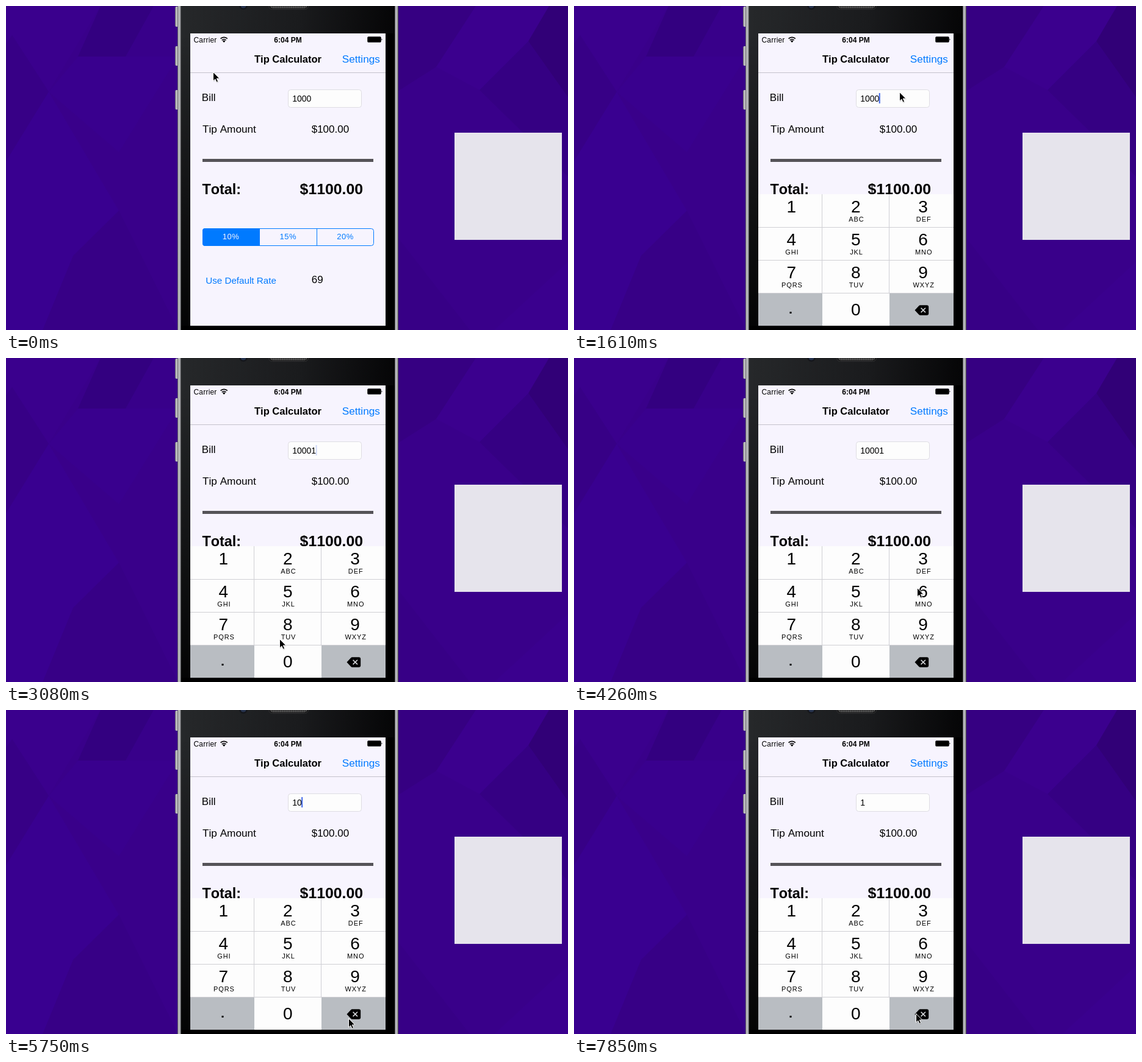
Animation of 921 by 532 pixels, one loop 8 s. Source, as an HTML page:

```html
<!DOCTYPE html>
<html lang="en">
<head>
<meta charset="utf-8">
<title>Tip Calculator</title>
<style>
  html, body { margin: 0; width: 100%; height: 100%; overflow: hidden; background: #38008a; }
  svg { display: block; width: 921px; height: 532px; }
  text { font-family: "Liberation Sans", Arial, sans-serif; font-kerning: none; white-space: pre; }
  .b { font-weight: bold; }
  .blue { fill: #007aff; }
  .mid { text-anchor: middle; }
</style>
</head>
<body>
<svg viewBox="0 0 921 532">
  <defs>
    <linearGradient id="metal">
      <stop offset="0" stop-color="#3c3c40"/>
      <stop offset=".25" stop-color="#b4b5b8"/>
      <stop offset=".7" stop-color="#b4b5b8"/>
      <stop offset="1" stop-color="#2a2a2c"/>
    </linearGradient>
    <linearGradient id="glass" x2="1" y2=".12">
      <stop offset="0" stop-color="#26282a"/>
      <stop offset=".55" stop-color="#1a1b1d"/>
      <stop offset="1" stop-color="#050506"/>
    </linearGradient>
    <linearGradient id="fade" x2="0" y2="1">
      <stop offset="0" stop-color="#000" stop-opacity="0"/>
      <stop offset="1" stop-color="#000" stop-opacity=".9"/>
    </linearGradient>
    <linearGradient id="knob">
      <stop offset="0" stop-color="#6d6d72"/>
      <stop offset=".5" stop-color="#d4d4d6"/>
      <stop offset="1" stop-color="#77777b"/>
    </linearGradient>
    <pattern id="mesh" width="3" height="3" patternUnits="userSpaceOnUse">
      <rect width="3" height="3" fill="#555"/><circle cx="1.5" cy="1.5" r=".9" fill="#1a1a1a"/>
    </pattern>
    <clipPath id="screen"><path d="M302 45h320v480h-320z"/></clipPath>
  </defs>

  <!-- wallpaper -->
  <path fill="#39008a" d="M0 0h921v532H0z"/>
  <g>
    <path fill="#3a008d" d="M0 0h155L70 141 10 48 0 62z"/>
    <path fill="#370086" d="M10 48 70 141 0 255V62z"/>
    <path fill="#330080" d="M155 0h87l-24 50-22 33h-78z"/>
    <path fill="#38008a" d="M242 0h40v84H118l78-1z"/>
    <path fill="#39008e" d="M70 141 118 83h164L185 240z"/>
    <path fill="#390090" d="M0 255 70 141l115 195-75 196H0z"/>
    <path fill="#370086" d="M110 410 185 336l97 196H60z"/>
    <path fill="#360082" d="M640 0h130l-65 100-63 40z"/>
    <path fill="#3b008e" d="M770 0h120l-34 58-80 80-71-38z"/>
    <path fill="#310077" d="M890 0h31v150L856 58z"/>
    <path fill="#350083" d="M856 58 921 150v130L776 138z"/>
    <path fill="#370086" d="M642 380 760 532H642z"/>
    <path fill="#3a008e" d="M921 420v112H800z"/>
  </g>
  <path fill="#e6e4ec" d="M735 208h176v176H735z"/>

  <!-- phone -->
  <g fill="url(#knob)">
    <rect x="277" y="1" width="6" height="33" rx="2"/>
    <rect x="277" y="66" width="6" height="32" rx="2"/>
    <rect x="277" y="138" width="6" height="32" rx="2"/>
  </g>
  <path fill="#050506" d="M281 0h362v532H281z"/>
  <path fill="url(#metal)" d="M281 0h6v532h-6zM637 0h6v532h-6z"/>
  <path fill="url(#metal)" d="M281 0h6v532h-6z"/>
  <path fill="url(#metal)" d="M637 0h6v532h-6z"/>
  <path fill="url(#glass)" d="M287 0h350v532H287z"/>
  <path fill="url(#fade)" d="M287 45h350v487H287z"/>
  <path fill="#000" d="M622 45h15v487h-15zM287 525h350v7H287z"/>
  <circle cx="389" cy="-1" r="7" fill="#15171c"/>
  <circle cx="389" cy="-1" r="4.5" fill="#27344f"/>
  <rect x="430.500" y="-8" width="65" height="13.500" rx="6" fill="#0b0b0c" stroke="#38383a"/>
  <rect x="432" y="-8" width="62" height="12" rx="5" fill="url(#mesh)"/>

  <!-- app -->
  <g clip-path="url(#screen)">
    <path fill="#f7f4fe" d="M302 45h320v480h-320z"/>
    <path fill="#c4c2cb" d="M302 109h320v1h-320z"/>
    <text x="307.5" y="60" font-size="12" letter-spacing=".2">Carrier</text>
    <g fill="none" stroke="#000" stroke-width="1.7">
      <path d="M351.6 53.6a8 8 0 0 1 11.2 0M353.8 56.1a5 5 0 0 1 6.8 0"/>
      <path fill="#000" stroke="none" d="M354.9 57.6a3.4 3.4 0 0 1 4.6 0l-2.3 2.4z"/>
    </g>
    <text class="b mid" x="462" y="60" font-size="12">6:04 PM</text>
    <rect x="592.5" y="50.5" width="22" height="9" rx="1.5" stroke="#000" stroke-opacity=".5"/>
    <path d="M615.5 53.5q2 1.5 0 3z"/>
    <text class="b mid" x="462" y="93" font-size="16.5">Tip Calculator</text>
    <text class="blue" x="550.8" y="93" font-size="17.2">Settings</text>

    <text x="320.8" y="156" font-size="17">Bill</text>
    <rect x="462.5" y="137.5" width="120" height="29" rx="4" fill="#fdfdfd" stroke="#dedde3"/>
    <text id="bill" x="469.2" y="157" font-size="14"></text>
    <rect id="caret" y="143" width="2" height="17" fill="#4169e8"/>
    <text x="322" y="208" font-size="17.2">Tip Amount</text>
    <text x="500.7" y="208" font-size="17">$100.00</text>
    <path fill="#555358" d="M322 251h280v5H322z"/>
    <text class="b" x="321.5" y="309" font-size="23.4">Total:</text>
    <text class="b" x="481.6" y="309" font-size="24.8">$1100.00</text>

    <rect x="322.5" y="365.5" width="280" height="28" rx="4" fill="none" stroke="#007aff"/>
    <path class="blue" d="M416 365v29h-90a4 4 0 0 1-4-4v-21a4 4 0 0 1 4-4zM509 365h1v29h-1z"/>
    <g class="mid" font-size="13" letter-spacing=".5">
      <text x="368.5" y="383" fill="#f7f4fe">10%</text>
      <text class="blue" x="462.3" y="383">15%</text>
      <text class="blue" x="556" y="383">20%</text>
    </g>
    <text class="blue" x="327.2" y="455.5" font-size="15.2">Use Default Rate</text>
    <text x="500.8" y="455" font-size="17">69</text>

    <g id="pad"></g>
  </g>

  <g id="mouse">
    <path d="M0 1.5v15l3.4-3 2.2 5 2.8-1.2-2.2-5H11z" fill="#000" opacity=".18"/>
    <path d="M-.5.5v14.6l3.3-3.1 2.3 5.2 2.5-1.1-2.3-5.1h4.6z" fill="#000" stroke="#fff"/>
  </g>
</svg>
<script>
  const LOOP = 8000;
  const GREY = '#b9bdc2', WHITE = '#fdfdfd';
  const $ = id => document.getElementById(id);
  const svgNS = 'http://www.w3.org/2000/svg';
  const pad = $('pad'), keys = {};

  function add(tag, attrs, label) {
    const el = document.createElementNS(svgNS, tag);
    for (const k in attrs) el.setAttribute(k, attrs[k]);
    if (label) el.textContent = label;
    return pad.appendChild(el);
  }

  // keypad
  const edges = [302, 407, 517, 622], mids = [356.2, 461.8, 572];
  const letters = ['', 'ABC', 'DEF', 'GHI', 'JKL', 'MNO', 'PQRS', 'TUV', 'WXYZ'];
  for (let i = 0; i < 12; i++) {
    const c = i % 3, r = (i - c) / 3, y = 309 + 54 * r;
    const label = '123456789.0<'[i];
    keys[label] = add('rect', {
      x: edges[c], y, width: edges[c + 1] - edges[c], height: 54,
      fill: r === 3 && c !== 1 ? GREY : WHITE
    });
    if (label === '.') add('rect', { x: 353.5, y: 502, width: 3, height: 3 });
    else if (label === '<') {
      add('path', { d: 'M558.5 499.5l6.5-7q1-1.2 2.6-1.2h10.6q3 0 3 3v10.4q0 3-3 3h-10.6q-1.6 0-2.6-1.2z' });
      add('path', { d: 'M568.6 495.7l7.4 7.4m0-7.4l-7.4 7.4', stroke: '#d6d8db', 'stroke-width': 1.6 });
    } else add('text', { class: 'mid', x: mids[c], y: r === 3 ? 508 : y + 30, 'font-size': 28 }, label);
    if (letters[i]) add('text', {
      class: 'mid', x: mids[c] + 1.2, y: y + 45, 'font-size': 11, 'letter-spacing': .9
    }, letters[i]);
  }
  add('path', {
    d: 'M406.5 309v162M516.5 309v162M302 363.5h320M302 417.5h320M302 471.5h320',
    stroke: '#cfcfd4', fill: 'none'
  });

  // bursts of activity: start, end, pictures
  const bursts = [
    [150, 880, 6], [1180, 2200, 8], [2500, 3520, 8], [3670, 4700, 8],
    [4850, 5750, 7], [6050, 6950, 7], [7100, 7850, 6]
  ];
  // pointer: time, x, y
  const path = [
    [0, 340, 108], [150, 352, 116], [442, 490, 176], [588, 556, 192], [734, 545, 160],
    [880, 534, 141], [1617, 534, 141], [1760, 500, 196], [1905, 420, 290], [2050, 356, 328],
    [2200, 346, 334], [2646, 346, 334], [2792, 372, 372], [2938, 425, 442], [3083, 449, 461],
    [3229, 462, 460], [3520, 486, 440], [3670, 510, 420], [3964, 556, 384], [4111, 563, 377],
    [4258, 563, 377], [4405, 563, 430], [4553, 563, 500], [4700, 563, 508], [4850, 562, 507],
    [5750, 562, 506], [6200, 562, 506], [6950, 561, 499], [7850, 561, 498]
  ];
  const typed = [[0, '1000'], [2640, '10001'], [5000, '1000'], [5300, '100'], [5600, '10'], [6200, '1']];
  const presses = [['1', 2500], ['<', 4850], ['<', 5150], ['<', 5450], ['<', 6050]];
  const wakes = [1180, 2500, 5000, 5300, 5600, 6200];
  const slide = [[0, 220], [1180, 150], [1320, 28], [1470, 0]];

  const lastOf = (rows, t) => rows.filter(r => r[0] <= t).pop();

  // hold each picture until the next one is due
  function snap(t) {
    const burst = lastOf(bursts, t);
    if (!burst) return 0;
    const [a, b, n] = burst, step = (b - a) / (n - 1);
    return a + step * Math.min(n - 1, Math.floor((t - a + 10) / step));
  }

  function pointAt(t) {
    const i = path.findIndex(p => p[0] > t);
    if (i < 0) return path[path.length - 1].slice(1);
    const p = path[i - 1], q = path[i], k = (t - p[0]) / (q[0] - p[0]);
    return [1, 2].map(n => Math.round(p[n] + (q[n] - p[n]) * k));
  }

  function caretAt(t) {
    const wake = wakes.filter(w => w <= t).pop();
    if (!wake) return 0;
    const phase = (t - wake) % 1000;
    if (phase < 450) return 1;
    if (phase < 630) return (630 - phase) / 180;
    return phase > 920 ? (phase - 920) / 80 : 0;
  }

  function draw(now) {
    const t = snap(now % LOOP) + 1;
    const [x, y] = pointAt(t - 1);
    const value = lastOf(typed, t)[1];
    $('mouse').setAttribute('transform', `translate(${x} ${y})`);
    $('bill').textContent = value;
    $('caret').setAttribute('x', 468.6 + 7.786 * value.length);
    $('caret').setAttribute('opacity', caretAt(t));
    pad.setAttribute('transform', `translate(0 ${lastOf(slide, t)[1]})`);
    const down = k => presses.some(([key, at]) => key === k && t >= at && t < at + 140);
    keys['1'].setAttribute('fill', down('1') ? GREY : WHITE);
    keys['<'].setAttribute('fill', down('<') ? WHITE : GREY);
  }

  const start = performance.now();
  function tick() {
    draw(performance.now() - start);
    requestAnimationFrame(tick);
  }
  tick();
</script>
</body>
</html>
```
